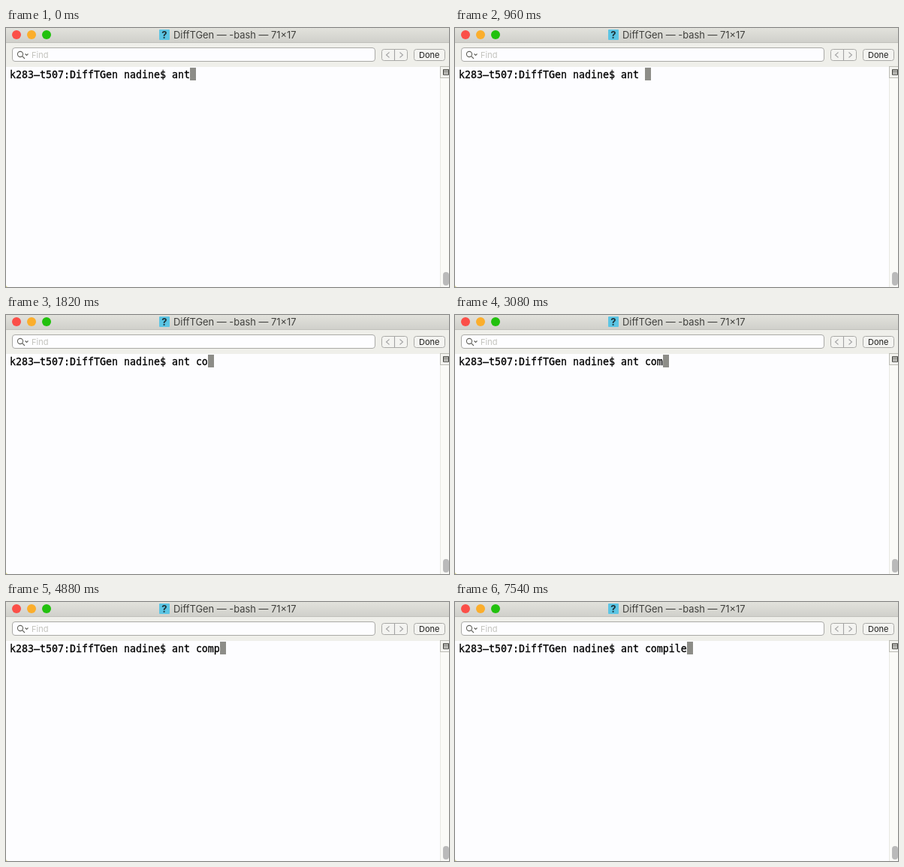
An HTML page that plays this animation: 590x346 px, repeating every 8 s.

```html
<!DOCTYPE html>
<html lang="en">
<head>
<meta charset="utf-8">
<title>Terminal typing</title>
<style>
  html, body { margin: 0; width: 100%; height: 100%; overflow: hidden; background: #fdfdff; }
  svg { display: block; width: 590px; height: 346px; }
  text { font-family: Inter, sans-serif; white-space: pre; }
  .shell { font: 13.29px "DejaVu Sans Mono", monospace; stroke: #000; stroke-width: .3; }
  .box { fill: #fdfdff; stroke: #a9a9a6; }
  .button { fill: #f4f4f1; }
  .mark { fill: none; stroke: #62625c; stroke-width: 1.1; }
  .dim { stroke: #a3a3a4; }
</style>
</head>
<body>
<svg viewBox="0 0 590 346">
  <defs>
    <linearGradient id="bar" x2="0" y2="1">
      <stop stop-color="#e2e2dc"/>
      <stop offset="1" stop-color="#cfcfca"/>
    </linearGradient>
  </defs>
  <rect width="590" height="346" fill="#fdfdff"/>

  <!-- title bar -->
  <rect width="590" height="20" fill="url(#bar)"/>
  <circle cx="14" cy="9" r="6" fill="#fb4f48"/>
  <circle cx="34" cy="9" r="6" fill="#fbae2c"/>
  <circle cx="54" cy="9" r="6" fill="#22c10e"/>
  <rect x="204" y="2" width="14" height="14" rx="1" fill="#5cc5e4"/>
  <text x="211" y="14" font-size="13" font-weight="700" text-anchor="middle" fill="#1d3238">?</text>
  <text x="223" y="14" font-size="12.9" fill="#3f3f3c">DiffTGen — -bash — 71×17</text>

  <!-- find bar -->
  <rect y="20" width="590" height="32" fill="#efefea"/>
  <path d="M0 19.5H590" stroke="#c0c0bb"/>
  <rect class="box" x="8.5" y="26.5" width="483" height="18" rx="3.5"/>
  <circle class="mark" cx="19" cy="35" r="3.6"/>
  <path class="mark" d="M21.6 37.6L25 41M25.5 34.5l2 2 2-2"/>
  <text x="34" y="40" font-size="11" fill="#c3c3bd">Find</text>
  <rect class="box button" x="500.5" y="28.5" width="34" height="15" rx="3"/>
  <path class="mark dim" d="M517.5 28.5v15M510.5 32.5l-4 3.5 4 3.5M524.5 32.5l4 3.5-4 3.5"/>
  <rect class="box button" x="543.5" y="28.5" width="41" height="15" rx="3"/>
  <text x="550" y="40" font-size="11" fill="#1c1c1a">Done</text>

  <!-- scroll bar -->
  <rect x="578" y="52" width="12" height="294" fill="#fafaf7"/>
  <path d="M578.5 52V346" stroke="#e8e8e2"/>
  <rect x="578.5" y="51.5" width="13" height="15" fill="#f4f4f0" stroke="#bbbbb4"/>
  <path d="M582.5 55.5h7v7h-7zM582.5 57.5h7M582.5 60h7" fill="none" stroke="#3d3d38"/>
  <rect x="582" y="326" width="8" height="18" rx="4" fill="#bababa"/>
  <path d="M0 343v3h3Q0 346 0 343" fill="#d8d37c"/>

  <rect id="cursor" y="53" width="8" height="17" fill="#8d8d88"/>
  <text id="line" class="shell" x="5" y="67"></text>
</svg>
<script>
  const LOOP = 8000, CELL = 8, LEFT = 5;
  const start = "k283–t507:DiffTGen nadine$ ant";
  const typed = " compile";
  const keyTimes = [820, 1280, 1820, 2800, 4640, 5340, 6140, 6720];
  const line = document.getElementById("line");
  const cursor = document.getElementById("cursor");

  function draw() {
    const time = performance.now() % LOOP;
    const count = keyTimes.filter(key => time >= key).length;
    const text = start + typed.slice(0, count);
    line.textContent = text;
    cursor.setAttribute("x", LEFT + text.length * CELL);
    requestAnimationFrame(draw);
  }
  draw();
</script>
</body>
</html>
```
